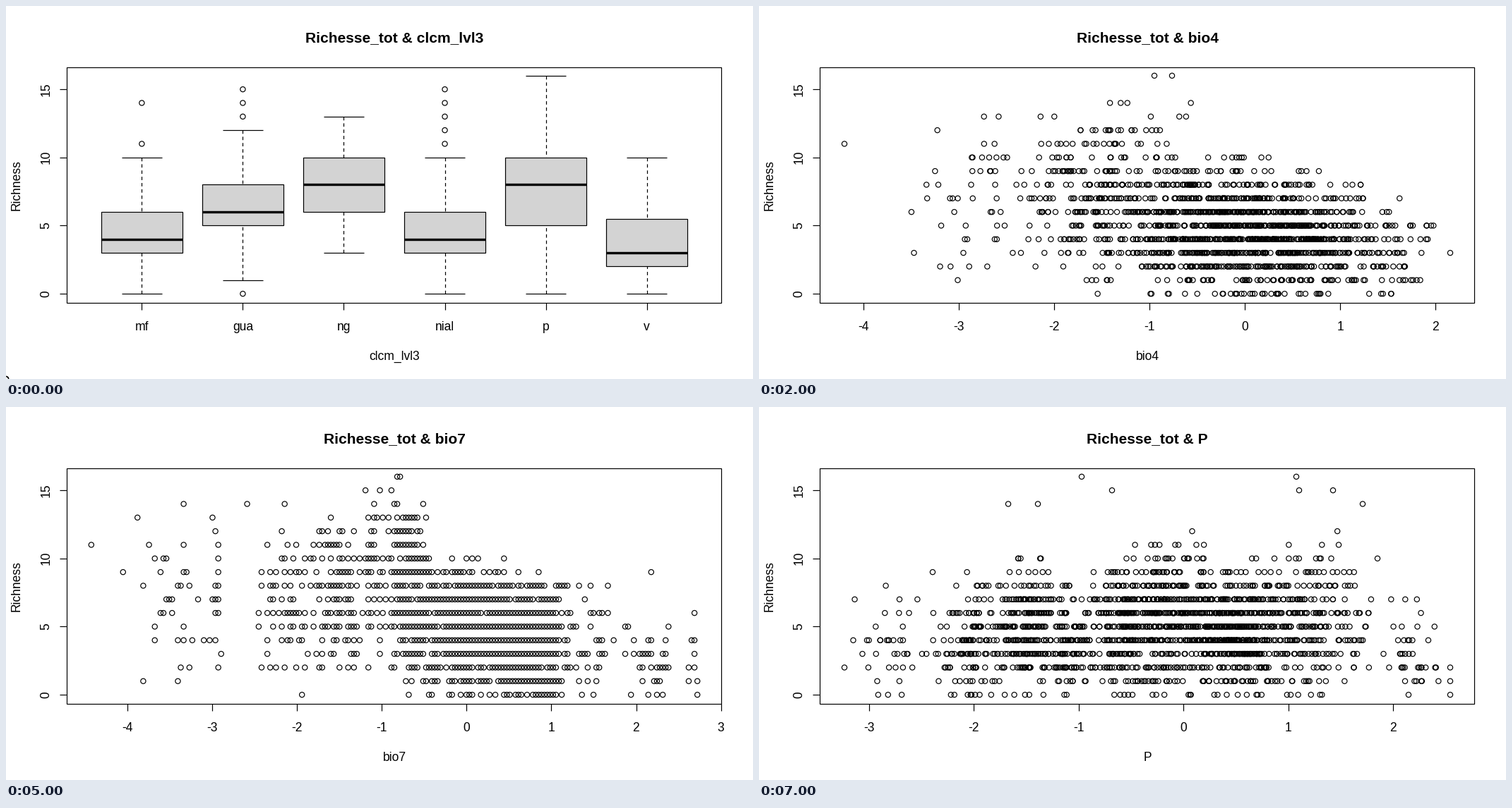
Recreate the animation shown at these times as a matplotlib script. Size 1058 by 529 pixels, loop 8 s.

```python
import numpy as np
import matplotlib.pyplot as plt
from matplotlib.animation import FuncAnimation

W, H, DPI = 1058, 529, 64
PX = 72 / DPI                                # one pixel in points
LEFT, RIGHT, TOP, BOTTOM = 86.2, 1013.2, 86.6, 420.6
MID = 550
X_MIN, X_MAX = 120.8, 979.2
THIN = 1.2 * PX
FONT = 17.55

plt.rcParams["font.family"] = "Liberation Sans"
fig = plt.figure(figsize=(W / DPI, H / DPI), dpi=DPI, facecolor="white")
ax = fig.add_axes([0, 0, 1, 1])


def level(richness):
    return 408.1 - 19.33 * np.asarray(richness)


def line(xs, ys, width=THIN, **kw):
    ax.plot(xs, ys, color="black", lw=width, solid_capstyle="butt", **kw)


def label(x, y, text, size=FONT, **kw):
    ax.text(x, y, text, fontsize=size * PX, ha="center", va="baseline",
            rotation_mode="anchor", **kw)


def circles(xs, ys):
    ax.scatter(xs, ys, s=(7.2 * PX) ** 2, facecolors="none",
               edgecolors="black", linewidths=THIN)


def panel(name, ticks):
    """Frame, axes and texts; ticks are (x, text) pairs."""
    line([LEFT, RIGHT, RIGHT, LEFT, LEFT], [TOP, TOP, BOTTOM, BOTTOM, TOP],
         solid_joinstyle="miter")
    for value in (0, 5, 10, 15):
        y = level(value)
        line([LEFT - 10.5, LEFT], [y, y])
        label(61.5, y, str(value), rotation=90)
    for x, text in ticks:
        line([x, x], [BOTTOM, BOTTOM + 10.5])
        label(x, 460, text)
    label(MID, 51, "Richesse_tot & " + name, 21.05, weight="bold")
    label(MID, 502, name)
    label(19.5, (TOP + BOTTOM) / 2, "Richness", rotation=90)


class Boxes:
    """Box plot; each group has its five levels and its outliers."""
    name = "clcm_lvl3"
    groups = (
        ("mf", (0, 3, 4, 6, 10), (11, 14)),
        ("gua", (1, 5, 6, 8, 12), (0, 13, 14, 15)),
        ("ng", (3, 6, 8, 10, 13), ()),
        ("nial", (0, 3, 4, 6, 10), range(11, 16)),
        ("p", (0, 5, 8, 10, 16), ()),
        ("v", (0, 2, 3, 5.5, 10), ()),
    )

    def draw(self):
        ticks = []
        for i, (text, stats, outliers) in enumerate(self.groups):
            x = MID + (i - 2.5) * 143.06
            low, q1, median, q3, high = level(stats)
            for end, start in ((low, q1), (high, q3)):
                line([x, x], [end, start], dashes=(4, 3.4))
                line([x - 28.6, x + 28.6], [end, end])
            ax.add_patch(plt.Rectangle((x - 57.2, q3), 114.4, q1 - q3, fc="#d3d3d3",
                                       ec="black", lw=THIN, zorder=3))
            line([x - 57.2, x + 57.2], [median, median], 3.4 * PX, zorder=4)
            circles([x] * len(outliers), level(outliers))
            ticks.append((x, text))
        panel(self.name, ticks)


class Scatter:
    """Seeded point clusters plus the few points that mark the outline."""

    def __init__(self, name, zero, unit, clusters, outline, step=None):
        self.name = name
        self.ticks = [(zero + k * unit, str(k)) for k in range(-5, 6)
                      if LEFT <= zero + k * unit <= RIGHT]
        rng = np.random.default_rng(7)
        groups = [np.array(outline, float)]
        groups += [self.cluster(rng, *c) for c in clusters]
        points = np.vstack(groups)
        if step:
            points[:, 0] = X_MIN + np.round((points[:, 0] - X_MIN) / step) * step
            points = np.unique(points, axis=0)
        self.xs, self.ys = points[:, 0], level(points[:, 1])

    @staticmethod
    def cluster(rng, centre, spread, count, mean):
        """Two truncated normals; richer clusters also vary more."""
        zx, zr = rng.normal(size=(2, 3 * count))
        x = centre + spread * zx
        r = np.round(mean + (0.9 + 0.3 * mean) * zr)
        keep = (abs(zx) < 2) & (abs(zr) < 2.4) & (x > X_MIN) & (x < X_MAX)
        keep &= (r >= 0) & (r <= 14)
        return np.column_stack([x, r])[keep][:count]

    def draw(self):
        circles(self.xs, self.ys)
        panel(self.name, self.ticks)


# clusters: centre x, spread, count, mean richness; outline: x, richness
SLIDES = [
    Boxes(),
    Scatter("gps_x", 579.5, 190.5,
            [(168, 16, 40, 8), (225, 20, 75, 7), (280, 16, 210, 7), (345, 23, 260, 7.2),
             (435, 30, 400, 4.6), (510, 20, 70, 5), (588, 34, 300, 4.3), (598, 11, 110, 7),
             (690, 32, 160, 4), (780, 18, 380, 3), (845, 14, 75, 4.5), (937, 8, 45, 3)],
            [(121, 11), (312, 16), (322, 16), (223, 15), (270, 15), (303, 15), (347, 15),
             (558, 14), (587, 14), (605, 14), (792, 11), (979, 7), (979, 6)]),
    Scatter("bio4", 688, 135,
            [(330, 60, 60, 7), (500, 60, 330, 7), (650, 60, 700, 4.8),
             (770, 50, 480, 4), (880, 40, 100, 3)],
            [(121, 11), (560, 16), (585, 16), (979, 3)]),
    Scatter("gps_y", 626.5, 170.2,
            [(150, 16, 55, 4.5), (207, 13, 140, 4), (310, 26, 95, 3.3), (410, 16, 85, 4.5),
             (470, 17, 145, 3.7), (520, 20, 140, 6), (585, 14, 290, 3.3), (630, 24, 220, 4.6),
             (680, 19, 220, 7), (708, 10, 120, 8.5), (755, 17, 290, 5.7), (830, 16, 110, 3.5),
             (880, 18, 50, 4), (940, 12, 22, 3)],
            [(121, 4), (666, 16), (679, 16), (657, 15), (706, 15), (641, 14), (735, 14),
             (817, 14), (817, 11), (940, 10), (507, 12), (579, 12), (970, 7), (979, 3)]),
    Scatter("pH", 529, 220,
            [(250, 60, 330, 5.5), (420, 80, 520, 5.5), (600, 80, 380, 4.6),
             (750, 50, 450, 4), (850, 40, 100, 3.5)],
            [(121, 6), (330, 16), (400, 16), (979, 4)]),
    Scatter("bio7", 652.3, 120.1,
            [(250, 30, 35, 7), (300, 5, 20, 7.5), (400, 22, 80, 6.5), (470, 20, 130, 7),
             (525, 12, 70, 9), (568, 14, 140, 9), (640, 45, 680, 4.8), (735, 32, 780, 3.8),
             (825, 20, 50, 4), (915, 20, 40, 2), (974, 4, 9, 2.5)],
            [(121, 11), (166, 9), (187, 13), (253, 14), (340, 14), (394, 14), (510, 15),
             (528, 15), (547, 15), (556, 16), (560, 16), (912, 9), (975, 6), (979, 0)],
            step=(X_MAX - X_MIN) / 210),
    Scatter("CaCO3", 312.3, 173.3,
            [(121, 25, 190, 7.5), (175, 30, 430, 6), (240, 32, 350, 4.3), (315, 34, 340, 4),
             (385, 32, 130, 3.8), (455, 30, 140, 3.8), (520, 25, 60, 3.7), (585, 16, 50, 3),
             (640, 15, 75, 4), (740, 35, 40, 2.3), (808, 11, 35, 3.8), (890, 30, 12, 2)],
            [(137, 16), (149, 16), (121, 15), (129, 15), (234, 14), (293, 14), (567, 14),
             (567, 11), (506, 11), (562, 10), (803, 10), (643, 9), (979, 3), (958, 0)]),
    Scatter("P", 601, 148.5,
            [(200, 35, 40, 4.3), (305, 30, 150, 4.2), (378, 20, 190, 4.8), (440, 25, 150, 4),
             (520, 26, 270, 5), (585, 30, 310, 5.5), (675, 32, 450, 4.5), (745, 26, 160, 5),
             (798, 17, 90, 6), (840, 14, 35, 4.5), (925, 22, 40, 3)],
            [(121, 2), (457, 16), (761, 16), (500, 15), (765, 15), (813, 15), (353, 14),
             (395, 14), (855, 14), (876, 10), (979, 0), (979, 1), (979, 2)]),
]


def show(i):
    ax.clear()
    ax.set(xlim=(0, W), ylim=(H, 0))
    ax.axis("off")
    SLIDES[i].draw()


anim = FuncAnimation(fig, show, frames=len(SLIDES), interval=1000,
                     init_func=lambda: None, repeat=True, repeat_delay=0)
plt.show()
```
